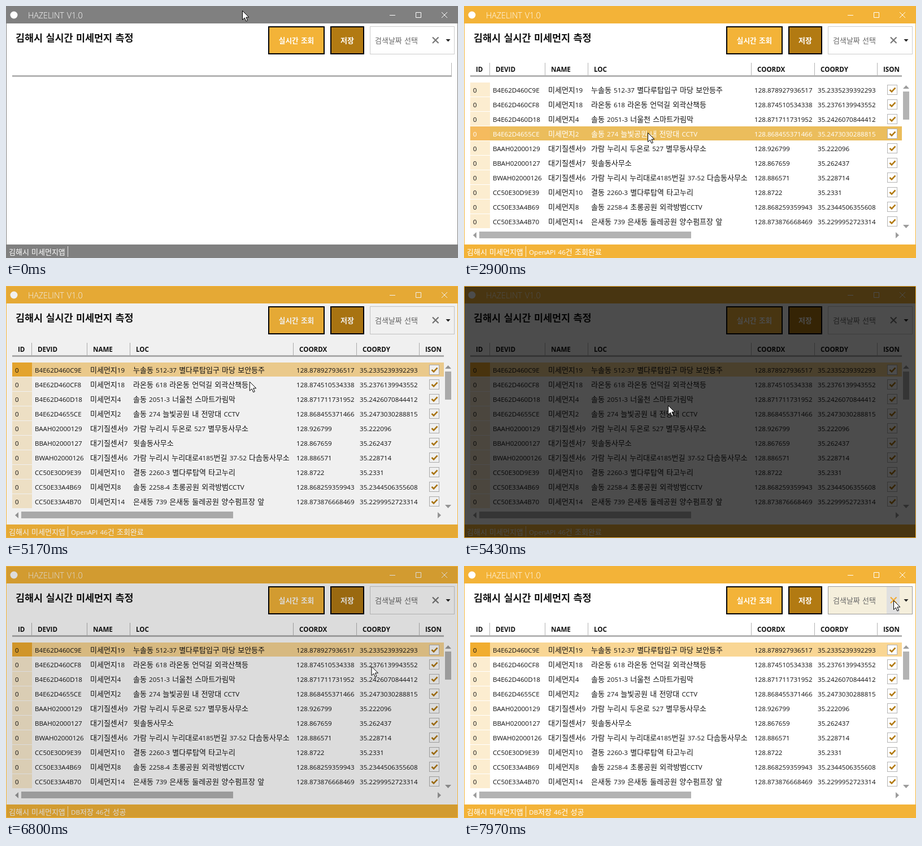
An HTML page for the animation above (8000 ms loop, 800x448 px).

```html
<!DOCTYPE html>
<html lang="ko">
<head>
<meta charset="utf-8">
<title>HAZELINT V1.0</title>
<style>
  html, body { margin: 0; width: 100%; height: 100%; overflow: hidden; background: #fff; }
  svg { display: block; width: 800px; height: 448px; --accent: #f3b338; }
  text { font-family: "Open Sans", "Noto Sans", sans-serif; fill: #111; word-spacing: 1.2px; }
  .ko { font-family: "Noto Sans CJK KR", "Noto Sans CJK", sans-serif; }
  .bold { font-weight: 700; }
  .thin { font-weight: 300; }
  .mid { text-anchor: middle; }
  .white { fill: #fff; }
  .accent { fill: var(--accent); }
  .line { fill: none; stroke: #fff; }
  .grey { fill: #b3b3b3; }
</style>
</head>
<body>
<svg id="app" viewBox="0 0 800 448"></svg>
<script>
const LOOP = 8000, TOP = 136, PITCH = 26;
const FOCUSED = 100, LOADED = 1970, PICKED = 3450, SAVING = 5150, CLOSED = 6550, CLEARED = 6850;

const columns = [
  ['ID', 11, 45], ['DEVID', 46, 143], ['NAME', 144, 219], ['LOC', 220, 508],
  ['COORDX', 509, 620], ['COORDY', 621, 731], ['ISON', 732, 775]
];

const records = [
  'B4E62D460C9E|미세먼지19|누솔동 512-37 별다루탑입구 마당 보안등주|128.878927936517|35.2335239392293',
  'B4E62D460CF8|미세먼지18|라온동 618 라온동 언덕길 외곽산책등|128.874510534338|35.2376139943552',
  'B4E62D460D18|미세먼지4|솔동 2051-3 너울천 스마트가림막|128.871711731952|35.2426070844412',
  'B4E62D4655CE|미세먼지2|솔동 274 늘빛공원 내 전망대 CCTV|128.868455371466|35.2473030288815',
  'BAAH02000129|대기질센서9|가람 누리시 두온로 527 별무동사무소|128.926799|35.222096',
  'BBAH02000127|대기질센서7|윗솔동사무소|128.867659|35.262437',
  'BWAH02000126|대기질센서6|가람 누리시 누리대로4185번길 37-52 다솜동사무소|128.886571|35.228714',
  'CC50E30D9E39|미세먼지10|결동 2260-3 별다루탑역 타고누리|128.8722|35.2331',
  'CC50E33A4B69|미세먼지8|솔동 2258-4 초롱공원 외곽방범CCTV|128.868259359943|35.2344506355608',
  'CC50E33A4B70|미세먼지14|은새동 739 은새동 둘레공원 양수펌프장 앞|128.873876668469|35.2299952723314'
].map(r => ['0', ...r.split('|')]);

// time, x, y of the pointer
const path = [
  [0, 418, 8], [100, 418, 8], [1000, 514, 62], [2000, 514, 62],
  [2820, 325, 225], [2950, 325, 225], [3400, 330, 150], [3500, 330, 150],
  [4270, 635, 75], [4500, 606, 64], [4750, 606, 64],
  [5400, 361, 212], [5500, 361, 212], [6250, 547, 268], [6550, 547, 268],
  [7010, 722, 110], [7070, 745, 89], [7500, 760, 61], [8000, 760, 61]
];

const rect = (x, y, w, h, attrs = '') =>
  `<rect x="${x}" y="${y}" width="${w}" height="${h}" ${attrs}/>`;
const shape = (d, attrs = '') => `<path d="${d}" ${attrs}/>`;

// Hangul runs sit slightly larger than the Latin around them
function text(x, y, str, size = 11.6, cls = '', attrs = '') {
  const ko = (size * 1.12).toFixed(2);
  const body = str.replace(/[가-힣]+/g, s => `<tspan class="ko" font-size="${ko}">${s}</tspan>`);
  return `<text x="${x}" y="${y}" font-size="${size}" class="${cls}" ${attrs}>${body}</text>`;
}

function button(x, y, w, h, fill, label, size) {
  return rect(x + 1, y + 1, w - 2, h - 2, `fill="${fill}" stroke="#000" stroke-width="2"`) +
    text(x + w / 2, y + h / 2 + 4.5, label, size, 'bold mid white');
}

function titleBar() {
  return rect(0, 0, 800, 31, 'class="accent"') +
    '<circle cx="14" cy="16" r="6.5" fill="#fff"/>' +
    text(39, 21.5, 'HAZELINT V1.0', 14.3, 'thin white') +
    shape('M679 16.5h10M725.5 11.5h9v9h-9zM771 11l10 10M781 11l-10 10', 'class="line"');
}

function toolbar() {
  return text(17, 63, '김해시 실시간 미세먼지 측정', 15.6, 'bold') +
    button(464, 36, 100, 50, '#f3b338', '실시간 조회', 11.3) +
    button(574, 36, 60, 50, '#b27a12', '저장', 11.6) +
    rect(644.5, 36.5, 149, 49, 'id="date"') +
    rect(748, 37, 23, 48, 'id="clearBox" fill="#e0e0e0"') +
    text(653, 65.5, '검색날짜 선택', 11.6, '', 'style="fill:#666"') +
    shape('M755 55.5l10.5 10.5M765.5 55.5l-10.5 10.5', 'id="clear" stroke-width="2.2"') +
    shape('M778.5 59h8l-4 4.5z', 'fill="#222"');
}

function emptyGrid() {
  return '<g id="empty">' + rect(11, 123, 778, 3, 'class="grey"') +
    rect(788, 101, 1, 22, 'class="grey"') + '</g>';
}

function header() {
  return rect(11, 123, 764, 3, 'class="grey"') +
    columns.map(([name, x, end], i) =>
      rect(x, 101, end - x, 22, 'class="head" fill="#dcdcdc"') +
      (i < 6 ? rect(end, 101, 1, 22, 'class="grey"') : '') +
      text(x + 10, 117, name, 11.6, 'bold')).join('');
}

function row(cells, i) {
  const y = TOP + i * PITCH;
  return '<g class="row">' +
    rect(46, y, 729, 25, 'class="band"') + rect(11, y, 35, 25, 'class="key"') +
    cells.map((c, k) => text(columns[k][1] + 5, y + 17.5, c)).join('') +
    rect(749.5, y + 4.5, 17, 17, 'fill="#fff" stroke="#b3b3b3"') +
    shape(`M753.5 ${y + 13}l3.5 3.5 6.5 -7`, 'fill="none" stroke="#b27a12" stroke-width="2.6"') +
    '</g>';
}

function scrollBars() {
  return rect(777, 152, 11, 50, 'class="grey"') + rect(27, 401, 375, 12, 'class="grey"') +
    shape('M777 147h11l-5.5 -6zM777 389h11l-5.5 6zM22 402v11l-6 -5.5zM764 402v11l6 -5.5z', 'fill="#9c9c9c"');
}

function dialog() {
  return '<g id="dialog">' + rect(0, 143, 800, 165, 'fill="#fff"') +
    text(201, 182, '저장', 24.5, 'thin') +
    text(201, 218, 'DB저장 성공!!', 14) +
    button(515, 248, 80, 35, '#9c6c12', 'OK', 11) + '</g>';
}

const app = document.getElementById('app');
app.innerHTML =
  rect(0, 0, 800, 448, 'fill="#fff"') + titleBar() + toolbar() + emptyGrid() +
  '<clipPath id="view">' + rect(11, 130, 764, 269) + '</clipPath>' +
  '<g id="grid">' + header() +
  '<g clip-path="url(#view)">' + records.map(row).join('') + '</g>' + scrollBars() + '</g>' +
  rect(0, 424, 800, 24, 'class="accent"') +
  text(5, 441.5, '김해시 미세먼지앱', 11.6, 'white') +
  rect(109, 427, 1, 19, 'fill="#fff" opacity=".8"') +
  '<g id="found">' + text(115, 441.5, 'OpenAPI 46건 조회완료', 11.6, 'white') + '</g>' +
  '<g id="saved">' + text(115, 441.5, 'DB저장 46건 성공', 11.6, 'white') + '</g>' +
  rect(0, 0, 800, 448, 'id="shade" fill="#000"') + dialog() +
  rect(0.5, 0.5, 799, 447, 'fill="none" stroke="var(--accent)"') +
  shape('M0.5 0.5v16l3.8 -3.5 2.6 6 2.6 -1.1 -2.6 -5.9h5.1z',
    'id="pointer" fill="#fff" stroke="#000" stroke-linejoin="round"');

const el = id => document.getElementById(id);
const rows = [...app.querySelectorAll('.row')].map(g => ({
  band: g.querySelector('.band'), key: g.querySelector('.key'), texts: g.querySelectorAll('text')
}));
const heads = [...app.querySelectorAll('.head')];

const ramp = (t, from, to) => Math.min(1, Math.max(0, (t - from) / (to - from)));
const show = (id, on) => { el(id).style.opacity = +on; };
const inside = ([px, py], x, y, w, h) => px >= x && px < x + w && py >= y && py < y + h;

function pointerAt(t) {
  const i = Math.max(1, path.findIndex(p => p[0] >= t));
  const [t0, x0, y0] = path[i - 1], [t1, x1, y1] = path[i];
  const k = ramp(t, t0, t1);
  const e = t1 - t0 < 100 ? k : k * k * (3 - 2 * k);
  return [x0 + (x1 - x0) * e, y0 + (y1 - y0) * e];
}

// band colour, key colour, text colour
const looks = {
  plain: ['transparent', '#fcedd0', '#111'],
  hover: ['#ebbd5c', '#f5bb5e', '#fff'],
  active: ['#f3b338', '#eda827', '#fff'],
  idle: ['#f9d694', '#f1ad30', '#111']
};

function draw(t) {
  const [x, y] = pointerAt(t);
  const over = pointerAt(Math.max(0, t - 60));
  const covered = t >= SAVING && t < CLEARED;
  const loaded = t >= LOADED;

  app.style.setProperty('--accent', t < FOCUSED ? '#808080' : '#f3b338');
  el('pointer').setAttribute('transform', `translate(${x.toFixed(1)} ${y.toFixed(1)})`);
  show('empty', !loaded);
  show('grid', loaded);
  show('found', loaded && t < CLOSED);
  show('saved', t >= CLOSED);

  rows.forEach((r, i) => {
    let look = 'plain';
    if (i === 0 && t >= PICKED) look = t < SAVING ? 'active' : 'idle';
    else if (!covered && inside(over, 11, TOP + i * PITCH, 764, PITCH)) look = 'hover';
    const [band, key, ink] = looks[look];
    r.band.style.fill = band;
    r.key.style.fill = key;
    r.texts.forEach(n => { n.style.fill = ink; });
  });
  heads.forEach((h, i) => {
    const [, from, to] = columns[i];
    h.style.opacity = +(!covered && inside(over, from, 101, to - from, 24));
  });

  const onDate = inside(over, 644, 36, 150, 50);
  const onClear = inside(over, 748, 37, 23, 48);
  el('date').style.fill = onDate ? '#f5efdc' : '#fff';
  el('date').style.stroke = onDate ? '#999' : '#ccc';
  show('clearBox', onClear);
  el('clear').style.stroke = onClear ? '#f0aa35' : '#777';

  show('shade', 0.7 * (ramp(t, SAVING, 5400) - ramp(t, 6600, CLEARED)));
  show('dialog', ramp(t, 5450, 5620) - ramp(t, CLOSED, 6700));
}

const start = performance.now();
function tick() {
  draw((performance.now() - start) % LOOP);
  requestAnimationFrame(tick);
}
draw(0);
requestAnimationFrame(tick);
</script>
</body>
</html>
```
